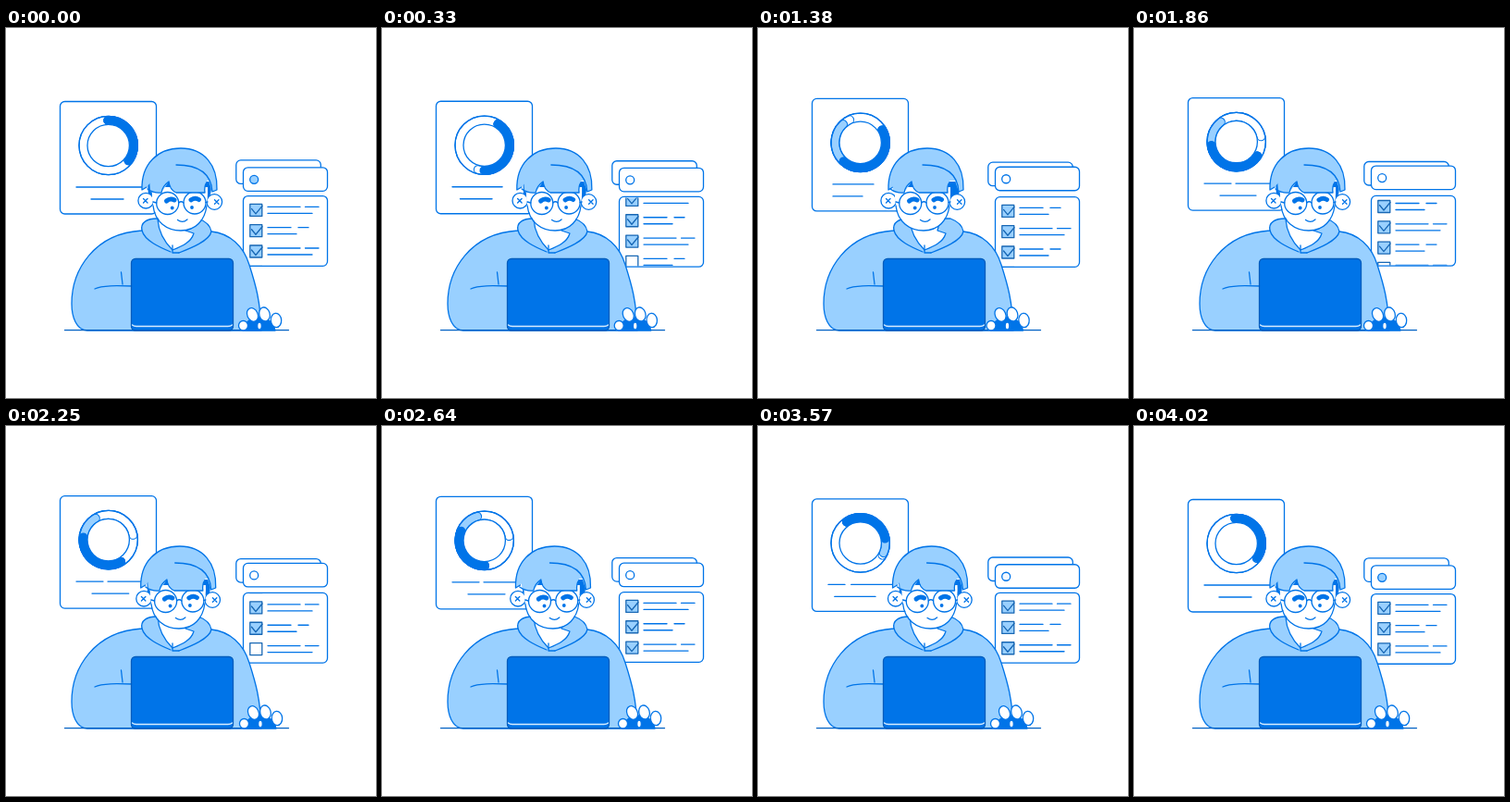
An HTML page that plays this animation: 400x400 px, repeating every 4050 ms.

```html
<!DOCTYPE html>
<html lang="en">
<head>
<meta charset="utf-8">
<title>Working at a laptop</title>
<style>
html, body { margin: 0; width: 100%; height: 100%; overflow: hidden; background: #fff; }
svg { display: block; width: 100vw; height: 100vh; }
.line { fill: none; stroke: #0074e8; stroke-width: 1.3; stroke-linecap: round; stroke-linejoin: round; }
.white { fill: #fff; }
.light { fill: #99d0ff; }
.dark { fill: #0074e8; }
</style>
</head>
<body>
<svg viewBox="0 0 400 400">
  <defs>
    <clipPath id="listClip"><rect x="257" y="1" width="90" height="74"/></clipPath>
  </defs>

  <g id="chart" class="line">
    <rect class="white" x="58.5" y="0" width="104" height="121.5" rx="5"/>
    <circle class="white" cx="110.7" cy="47.5" r="31.7"/>
    <g id="ring"></g>
    <circle cx="110.7" cy="47.5" r="31.7"/>
    <circle class="white" cx="110.7" cy="47.5" r="22.7"/>
    <path id="chartText"/>
  </g>

  <g id="backCard" class="line"><rect class="white" x="248.8" width="91.5" height="25.5" rx="5"/></g>
  <g id="frontCard" class="line">
    <rect class="white" x="256.5" width="91" height="25.5" rx="5"/>
    <circle id="radio" class="light" cx="268.2" cy="13" r="4.5"/>
  </g>
  <g id="list" class="line">
    <rect class="white" x="256.5" width="91" height="75.7" rx="5"/>
    <g clip-path="url(#listClip)"><g id="rows"></g></g>
  </g>

  <g class="line">
    <path class="light" d="M88 327C76 327 71 312 71 298C71 262 95 222 147 219C145 210 153 206 163 206H208C216 209 221 214 222 220C242 222 257 236 263 256C270 278 275 295 276 327Z"/>
    <path d="M147 219C150 230 166 237 178 242M187 243C200 238 220 230 222 220M124.500 264L126 277M96 282C104 278 120 278.500 136 279"/>
    <path class="white" d="M164 207C165 221 172 232 180 240C190 236 200 232 203 222L194 219L197 207Z"/>
    <path d="M180 235V243L187 243"/>
  </g>

  <g id="hairBack"><path class="dark" d="M153 166H221Q223 176 220 183H154Z"/></g>
  <g id="face" class="line">
    <circle class="white" cx="151.200" cy="186.700" r="8.300"/>
    <circle class="white" cx="225.300" cy="188" r="8.300"/>
    <path d="M148.500 184.500l4.500 4.500m0 -4.500l-4.500 4.500M225.500 185.800l4.500 4.500m0 -4.500l-4.500 4.500"/>
    <path class="white" stroke="none" d="M158 172C156 205 171 219 189 219C207 219 219 204 218 172Z"/>
    <path d="M159 192C161 210 174 219 189 219C205 219 215 208 217 192"/>
    <circle class="white" cx="174.700" cy="189.500" r="12"/>
    <circle class="white" cx="204" cy="189" r="12"/>
    <path d="M186.700 189Q189.300 186.500 192 189M162.700 189L159 188M216 188.500L218 188M185.500 207.500Q191 211.500 196 207"/>
    <g id="brows" stroke-width="5"><path d="M173.500 187Q177.500 183.500 182 186M200 185.800Q204.500 183 208.500 185.500"/></g>
    <g id="eyes" class="dark" stroke="none"><circle cx="179.700" cy="194.500" r="1.900"/><circle cx="201" cy="194" r="1.900"/></g>
  </g>
  <g id="crown" class="line">
    <path class="light" stroke="none" d="M147 175C146 147 164 130 189 130C214 130 229 148 228 175L223 177L219 165H158L152 172Z"/>
    <path d="M152 172L147 175C146 147 164 130 189 130C214 130 229 148 228 175L223 177C222 160 212 148 184 148"/>
  </g>
  <g id="bangs" class="line">
    <path class="light" stroke="none" d="M155 164L156 177Q162 179 168 178L176 166Q178 175 184 178H215Q214 171 218 164Z"/>
    <path d="M153 174Q160 179 168 178Q169 171 176 166Q177 175 184 178H215Q214 171 217 167"/>
  </g>

  <g class="line">
    <path d="M63.500 326.700H305.500" stroke="#0061c4"/>
    <rect class="dark" x="135.500" y="249.500" width="110" height="77.500" rx="4.500" stroke="#005cbd"/>
    <path d="M136.500 321Q138 322.500 141 322.500H240Q243 322.500 244.500 321" stroke="#d7ecff"/>
  </g>

  <g id="hand" class="line">
    <path class="dark" d="M256 327Q260 313 274 313Q288 314 291 327Z"/>
    <ellipse class="white" cx="274" cy="322" rx="2.300" ry="4"/>
    <ellipse class="white" cx="256.500" cy="321.700" rx="5" ry="5.200"/>
    <g id="fingers"></g>
  </g>
</svg>
<script>
const LOOP = 4050;
const TIMES = [0, 690, 1380, 1860, 2640, 3180, LOOP];
const el = id => document.getElementById(id);
const clamp = x => Math.max(0, Math.min(1, x));
const ease = x => { x = clamp(x); return x * x * (3 - 2 * x); };
const moveTo = (id, x, y) => el(id).setAttribute('transform', `translate(${x} ${y})`);
const wave = (t, mid, size, peak) => mid + size * Math.cos((t - peak) / LOOP * 2 * Math.PI);

// Periodic monotone cubic through the poses at TIMES.
function track(values) {
  const n = TIMES.length - 1;
  const slope = i => {
    const k = (i + n) % n;
    return (values[k + 1] - values[k]) / (TIMES[k + 1] - TIMES[k]);
  };
  const tangent = i => {
    const a = slope(i - 1), b = slope(i);
    return a * b > 0 ? 2 * a * b / (a + b) : 0;
  };
  return t => {
    let i = 0;
    while (i < n - 1 && t >= TIMES[i + 1]) i++;
    const h = TIMES[i + 1] - TIMES[i], u = (t - TIMES[i]) / h, v = 1 - u;
    return values[i] * v * v * (1 + 2 * u) + values[i + 1] * u * u * (3 - 2 * u)
      + h * (tangent(i) * u * v * v - tangent(i + 1) * u * u * v);
  };
}

const ringStart = track([-91, -33, -30, 34, 89, 204, 269]);
const darkEnd = track([37, 130, 132, 172, 202, 307, 397]);
const lightEnd = track([37, 155, 227, 232, 254, 371, 397]);
const whiteEnd = track([37, 195, 245, 348, 350, 383, 397]);
const headShift = track([0, -5.3, -10, 0, -4.2, -4.2, 0]);
const handShift = track([0, -1, -4.5, -3, 4, 0, 0]);
const chartLines = [
  [92.5, track([76, 76, 81, 76, 76, 76, 76]), track([101, 111, 125, 105, 105, 91, 101])],
  [92.5, track([100, 111, 125, 110, 110, 102, 100]), track([147, 111, 125, 147, 147, 147, 147])],
  [105.5, track([92, 76, 81, 93, 93, 76, 92]), track([127, 110, 113, 132, 133, 127, 127])]
];

function arc(from, to, color, width) {
  const at = deg => {
    const a = deg * Math.PI / 180;
    return `${110.7 + 27.2 * Math.cos(a)} ${47.5 + 27.2 * Math.sin(a)}`;
  };
  const large = to - from > 180 ? 1 : 0;
  return `<path d="M${at(from)}A27.2 27.2 0 ${large} 1 ${at(to)}" stroke="${color}" stroke-width="${width}"/>`;
}

function drawRing(t) {
  const from = ringStart(t), dark = '#0074e8';
  const outlined = (to, color) => arc(from, to, dark, 9.8) + arc(from, to, color, 7.6);
  el('ring').innerHTML = outlined(whiteEnd(t), '#fff') + outlined(lightEnd(t), '#99d0ff')
    + arc(from, darkEnd(t), dark, 9.8);
}

function listRow(index, y, check) {
  const text = index % 2
    ? 'M283 3H308M316 3H327M283 10H314'
    : 'M283 3H318M323.500 3H338M283 10H331';
  const tick = check > 0
    ? `<path d="M265.500 5L270 10.500L277 2" pathLength="1" stroke-dasharray="${check} 2"/>` : '';
  return `<g transform="translate(0 ${y})">
    <rect x="263.800" y="0" width="13" height="13" fill="#99d0ff" fill-opacity="${check}" stroke="#1767b4"/>
    <g stroke="#1767b4">${tick}</g><path d="${text}"/></g>`;
}

function drawList(t) {
  const scroll = ease((t - 40) / 560) + ease((t - 1700) / 620);
  const checkTimes = [-500, -500, -500, 850, 2380];
  el('rows').innerHTML = checkTimes.map((start, i) =>
    listRow(i, 8.8 + 22.3 * (i - scroll), clamp((t - start) / 200))).join('');
}

function draw(t) {
  moveTo('chart', 0, wave(t, 77.5, 2, 0));
  moveTo('backCard', 0, wave(t, 143.5, 1.7, 1250));
  moveTo('frontCard', 0, wave(t, 149.8, 1.6, 550));
  moveTo('list', 0, wave(t, 181.3, 1.8, 900));
  drawRing(t);
  drawList(t);
  el('chartText').setAttribute('d', chartLines.map(([y, from, to]) => {
    const a = from(t), b = to(t);
    return b - a > 0.5 ? `M${a} ${y}H${b}` : '';
  }).join(''));

  const selected = clamp((t - 3550) / 150) + 1 - clamp((t - 150) / 200);
  el('radio').style.fillOpacity = clamp(selected);

  const shift = headShift(t);
  moveTo('face', shift, 0);
  moveTo('bangs', shift, 0);
  moveTo('crown', shift * 0.6, 0);
  moveTo('hairBack', shift * 0.4, 0);
  const blink = clamp(2 - Math.abs(t - 690) / 60);
  moveTo('brows', 0, blink);
  el('eyes').style.opacity = 1 - blink;
  moveTo('hand', handShift(t), 0);
}

el('fingers').innerHTML = [[266.5, 310, -24], [279.5, 309.5, -16], [292, 316, -4]].map(([x, y, turn]) =>
  `<ellipse class="white" cx="${x}" cy="${y}" rx="5.700" ry="7.600" transform="rotate(${turn} ${x} ${y})"/>`).join('');

const begin = performance.now();
function tick(now) {
  draw(Math.max(0, now - begin) % LOOP);
  requestAnimationFrame(tick);
}
draw(0);
requestAnimationFrame(tick);
</script>
</body>
</html>
```
